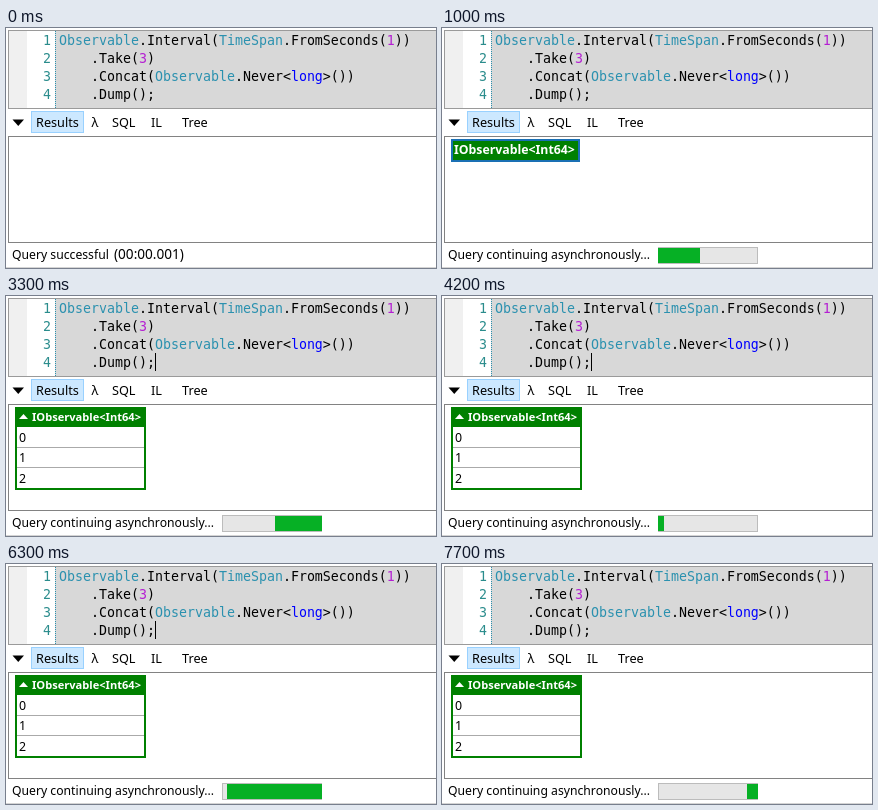
Write an HTML page with a canvas that moves like this. It is 430x240 px and loops after 7800 ms.

```html
<!DOCTYPE html>
<html lang="en">
<head>
<meta charset="utf-8">
<title>Observable query</title>
<style>
html, body { margin: 0; width: 100%; height: 100%; overflow: hidden; background: #fff; }
canvas { display: block; width: 430px; height: 240px; }
</style>
</head>
<body>
<canvas id="stage" width="430" height="240"></canvas>
<script>
const ctx = document.getElementById('stage').getContext('2d');

const LOOP = 7800, STEP = 100, START = 300;
const MONO = '13.29px "DejaVu Sans Mono", monospace';
const ui = (size, weight = 400) => `${weight} ${size}px "Noto Sans", "Open Sans", sans-serif`;

const TEAL = '#2b91af', BLACK = '#000', GREEN = '#008000';
const PURPLE = '#b41ed2', BLUE = '#0000ff', LINE = '#828282', NUMBER = '#2a8c8c';

// Each code line is a list of [text, colour] parts.
const CODE = [
  [['Observable', TEAL], ['.Interval('], ['TimeSpan', TEAL], ['.FromSeconds('], ['1', PURPLE], ['))']],
  [['    .Take('], ['3', PURPLE], [')']],
  [['    .Concat('], ['Observable', TEAL], ['.Never<'], ['long', BLUE], ['>())']],
  [['    .Dump();']]
];

const ROW_TIMES = [1400, 2400, 3300];
const ROW_HEIGHT = 20.5;
// The caret flips at each of these times, starting hidden.
const CARET_FLIPS = [300, 700, 1200, 1700, 2200, 2700, 3200, 3700, 4200, 4800, 5300, 5800, 6300, 6800, 7300, 7700];

function rect(x, y, w, h, color) {
  ctx.fillStyle = color;
  ctx.fillRect(x, y, w, h);
}

function frame(x, y, w, h, fill, edge, line = 1) {
  rect(x, y, w, h, edge);
  rect(x + line, y + line, w - 2 * line, h - 2 * line, fill);
}

function text(str, x, y, font, color = BLACK) {
  ctx.font = font;
  ctx.fillStyle = color;
  ctx.fillText(str, x, y);
}

function triangle(x1, x2, base, tip, color) {
  ctx.fillStyle = color;
  ctx.beginPath();
  ctx.moveTo(x1, base);
  ctx.lineTo(x2, base);
  ctx.lineTo((x1 + x2) / 2, tip);
  ctx.fill();
}

function drawEditor(t) {
  frame(2, 2, 440, 79, '#d8d8d8', '#9a9a9a');
  rect(3, 3, 18, 77, '#f0f0f0');
  rect(21, 3, 28, 77, '#fff');
  for (let y = 3; y < 80; y += 2) rect(49, y, 1, 1, TEAL);
  CODE.forEach((parts, i) => {
    const y = 17 + i * 18;
    text(String(i + 1), 37, y, MONO, NUMBER);
    let x = 53;
    for (const [str, color] of parts) {
      text(str, x, y, MONO, color);
      x += ctx.measureText(str).width;
    }
  });
  const flips = CARET_FLIPS.filter(time => time <= t).length;
  if (flips % 2) rect(149, 57, 1, 18, BLACK);
}

function drawTabs() {
  triangle(6.5, 18, 91.5, 98, BLACK);
  frame(25, 83, 53, 22, '#cce8ff', '#99d1ff');
  const tabs = [['Results', 30], ['λ', 85.5], ['SQL', 106], ['IL', 145], ['Tree', 176]];
  for (const [label, x] of tabs) text(label, x, 99, ui(12.7));
}

function drawResults(t) {
  frame(2, 108, 440, 107, '#fff', LINE);
  if (t < START) return;
  const rows = ROW_TIMES.filter(time => time <= t).length;
  if (!rows) {
    frame(9, 111, 129, 23, GREEN, '#1a70b4', 2);
    text('IObservable<Int64>', 12, 126, ui(12.3, 700), '#fff');
    return;
  }
  const rowTop = i => Math.floor(130.5 + i * ROW_HEIGHT);
  frame(9, 111, 131, rowTop(rows) - 109, '#fff', GREEN, 2);
  rect(9, 111, 131, 20, GREEN);
  triangle(13, 22, 123, 118, '#fff');
  text('IObservable<Int64>', 26, 125, ui(11.1, 700), '#fff');
  for (let i = 0; i < rows; i++) {
    if (i) rect(11, rowTop(i), 127, 1, '#aaa');
    text(String(i), 13, Math.floor(146 + i * ROW_HEIGHT), ui(12.4));
  }
}

function drawProgress(t) {
  frame(216, 219, 100, 17, '#e6e6e6', '#bcbcbc');
  const phase = (t - START) % 3800;
  const head = Math.min(316, 216 + phase * 0.06);
  const tail = Math.max(216, 215 + (phase - 2100) * 0.06);
  if (head > tail) rect(Math.round(tail), 220, Math.round(head) - Math.round(tail), 15, '#06b025');
}

function drawStatus(t) {
  rect(0, 239, 430, 1, '#d4d4d4');
  if (t < START) {
    text('Query successful', 6, 231, ui(12.2));
    text('(00:00.001)', 108, 231, ui(13.6));
  } else {
    text('Query continuing asynchronously...', 6, 231, ui(12.2));
    drawProgress(t);
  }
}

function draw(now) {
  const t = Math.floor((now % LOOP) / STEP) * STEP;
  rect(0, 0, 430, 240, '#fff');
  drawEditor(t);
  drawTabs();
  drawResults(t);
  drawStatus(t);
}

let begin = null;
function tick(now) {
  if (begin === null) begin = now;
  draw(now - begin);
  requestAnimationFrame(tick);
}
draw(0);
requestAnimationFrame(tick);
</script>
</body>
</html>
```
